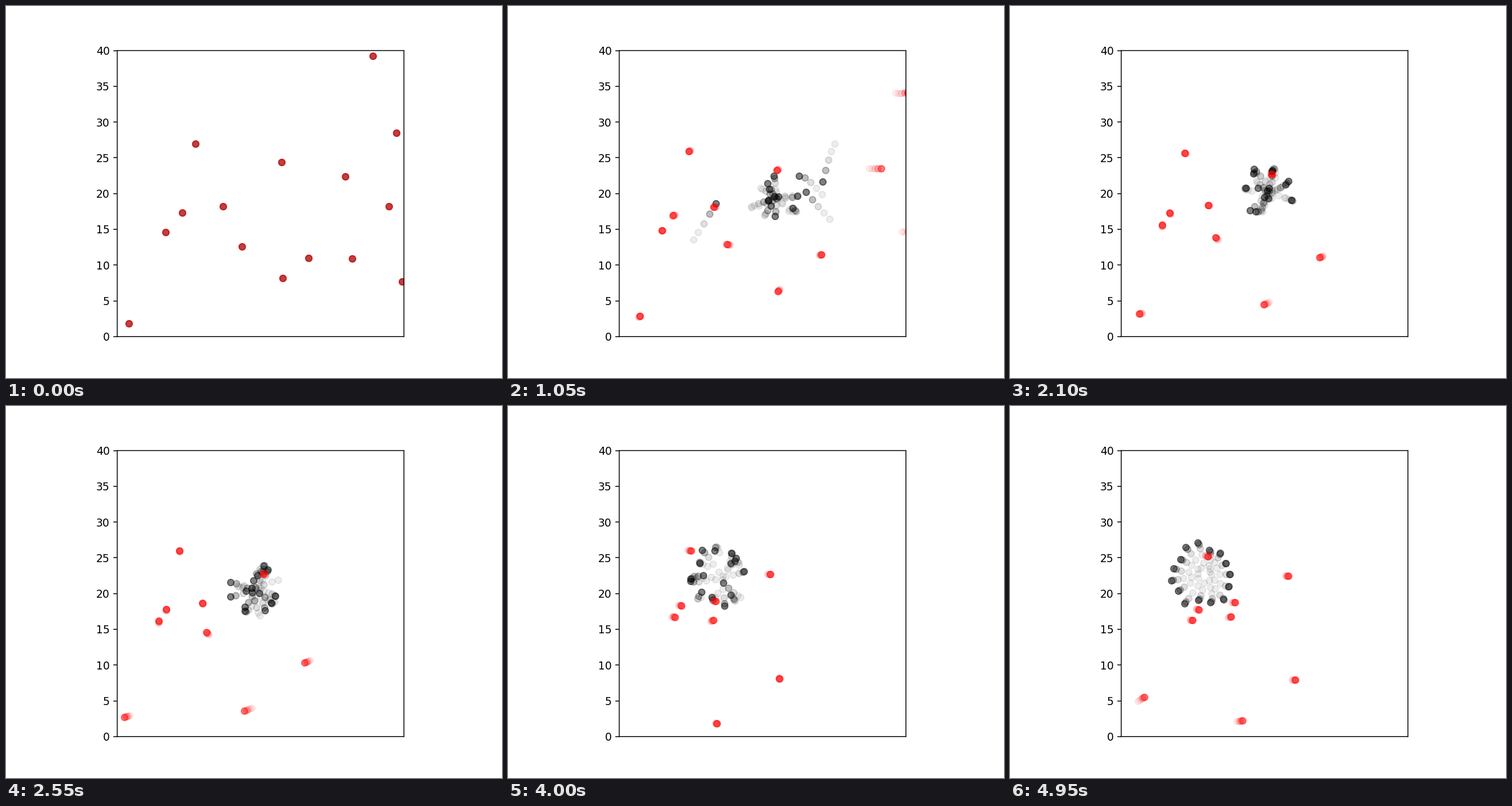
Animation of 864 by 648 pixels, one loop 5000 ms. Source, as a matplotlib script:

```python
import numpy as np
import matplotlib.pyplot as plt
from matplotlib.animation import FuncAnimation

FRAMES = 100
STAGE = np.array([864, 648])
ORIGIN = np.array([193.7, 575.8])  # lower left plot corner, in stage pixels
SPAN = np.array([499.5, 498.2])    # plot width and height
LIMIT = 40
FADE = [0.5, 0.25, 0.125, 0.07, 0.07]  # opacity by age in frames

frame = np.arange(FRAMES)
rng = np.random.default_rng(4)

starts = np.array([
    (213.5, 553), (277.5, 394), (307, 360), (330, 240.5), (377.5, 349),
    (410.5, 419), (479.5, 272), (482, 474), (527, 439), (591, 297),
    (603, 440), (639, 87), (667, 349), (680, 221), (689.5, 480)])


def swarm():
    """Gather at a wandering centre, then swing through it again and again."""
    count = len(starts)
    poses = [0, 33, 51, 65, 80, 99]
    centre = np.column_stack([
        np.interp(frame, poses, [465, 469, 428, 396, 364, 333]),
        np.interp(frame, poses, [345, 328, 317, 306, 295, 293])])

    # the swings run out of step but all peak together at the end
    left = frame[-1] - frame
    rate = rng.uniform(0.26, 0.34, (count, 1))
    turn = rng.uniform(-0.03, 0.03, (count, 1))
    reach = rng.uniform(0.8, 1.2, (count, 1)) * np.linspace(36, 50, FRAMES)
    angle = 2 * np.pi * np.arange(count)[:, None] / count + turn * left
    swing = reach * np.cos(rate * left)
    offset = np.stack([swing * np.cos(angle), swing * np.sin(angle)], axis=-1)

    # the pull towards the centre is stronger vertically
    pull = np.array([1, 1.6])
    gap = np.linalg.norm((centre[0] - starts) * pull, axis=1)
    travel = 5 * frame ** 1.27
    near = np.minimum(1, travel[:, None] / gap[:, None, None] * pull)
    home = starts[:, None]
    return home + (centre - home) * near + offset * near ** 3


def glide(times, points):
    """Smooth curve through a few timed points."""
    t, p = np.array(times, float), np.array(points, float)
    v = np.gradient(p, t, axis=0)
    now = np.minimum(frame, t[-1])
    i = np.clip(np.searchsorted(t, now, side="right") - 1, 0, len(t) - 2)
    h = (t[i + 1] - t[i])[:, None]
    u = (now - t[i])[:, None] / h
    return ((1 + 2 * u) * (1 - u) ** 2 * p[i] + u * (1 - u) ** 2 * h * v[i]
            + u * u * (3 - 2 * u) * p[i + 1] + u * u * (u - 1) * h * v[i + 1])


def stay(i, middle, back, end, turn=65):
    """Drift slowly, turn round once and head right."""
    return glide([0, 33, turn, 99], [starts[i], middle, back, end])


def leave(i, x, y):
    """Drift off through the right side."""
    return glide([0, 11, 33], [starts[i], (x, y), (x + 112, y)])


drifters = [
    stay(0, (233.5, 534.5), (178, 545), (234, 506.5), turn=77),
    stay(1, (265, 387), (273.5, 366.5), (318, 373.5)),
    stay(2, (280, 364.5), (286, 346), (329, 354.5)),
    stay(3, (308, 257.5), (303.5, 248), (345, 262)),
    stay(4, (349.5, 349), (344.5, 339.5), (392, 342)),
    stay(5, (367, 410.5), (344.5, 380.5), (385, 366.5)),
    stay(6, (462, 292), (443.5, 291.5), (484.5, 296)),
    stay(7, (459.5, 510), (363.5, 553), (404.5, 548), turn=80),
    stay(8, (549, 433), (472.5, 475), (497, 477), turn=80),
    leave(9, 606, 285), leave(10, 656, 401), leave(11, 653, 141),
    leave(12, 715, 340), leave(13, 712, 252), leave(14, 715, 496),
]

fig = plt.figure(figsize=(6.4, 4.8), dpi=135)
ax = fig.add_axes([ORIGIN[0] / STAGE[0], 1 - ORIGIN[1] / STAGE[1],
                   *SPAN / STAGE])
ax.set(xlim=(0, LIMIT), ylim=(0, LIMIT), xticks=[])
for spine in ax.spines.values():
    spine.set_snap(False)


def to_data(pixels):
    return (np.array(pixels) - ORIGIN) * [1, -1] / SPAN * LIMIT


def trail(color):
    """One set of dots per age, the oldest drawn first."""
    ages = reversed(list(enumerate(FADE)))
    return [(age, ax.plot([], [], "o", color=color, alpha=alpha)[0])
            for age, alpha in ages]


groups = [(to_data(swarm()), trail("black")),
          (to_data(drifters), trail("red"))]


def update(n):
    for spots, dots in groups:
        for age, dot in dots:
            x, y = spots[:, n - age].T if n >= age else ([], [])
            dot.set_data(x, y)
    return [dot for _, dots in groups for _, dot in dots]


anim = FuncAnimation(fig, update, frames=FRAMES, interval=50,
                     repeat=True, repeat_delay=0)
plt.show()
```
